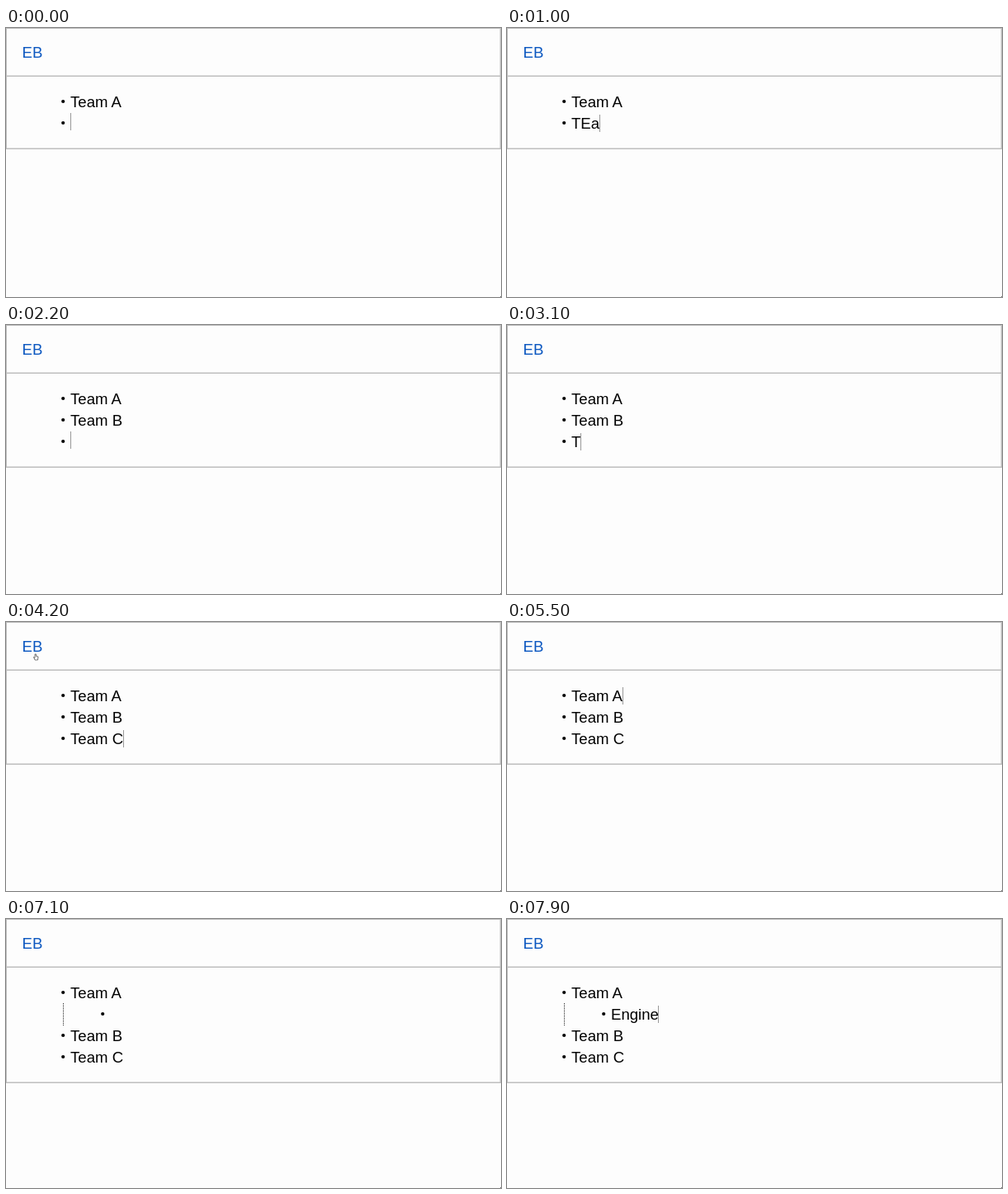
An HTML page that plays this animation: 600 px wide and 326 px high, repeating every 8 s.

```html
<!DOCTYPE html>
<html lang="en">
<head>
<meta charset="utf-8">
<title>Outline editor</title>
<style>
html, body { margin: 0; width: 100%; height: 100%; overflow: hidden; background: #fdfdfd; }
svg { display: block; width: 600px; height: 326px; }
text { font: 18.6px "Liberation Sans", Arial, sans-serif; white-space: pre; }
</style>
</head>
<body>
<svg viewBox="0 0 600 326">
  <g fill="none" stroke="#bebebe" stroke-width="1.5">
    <path d="M0 .25H600M0 58.2H600" />
    <path id="frame" />
  </g>
  <rect x="599" y="325" width="1" height="1" fill="#777" />
  <text x="19.5" y="35.7" fill="#0b57c0">EB</text>
  <g id="rows"></g>
  <path id="guide" d="M69.5 102V129" stroke="#222" stroke-dasharray="1 1" />
  <rect id="caret" width="1" height="21" fill="#999" />
  <path id="pointer" fill="#fff" stroke="#555" stroke-width=".8" />
</svg>
<script>
const LOOP = 8000, ROW = 26;
const $ = id => document.getElementById(id);
const shapes = {
  hand: 'M-1 -3.5V1L-2.5 0L-1 3.5H2.5L3 -.5L.5 -1V-3.5Z',
  arrow: 'M0 -4V4L2 2.5H4.5Z',
  beam: 'M-1.5 -4.5H1.5M0 -4.5V4.5M-1.5 4.5H1.5'
};

// Each step is [time, document]; "_" is the caret, a tab indents.
const steps = [];
const type = (before, after, list) =>
  list.forEach(([t, s]) => steps.push([t, before + s + after]));

type('Team A\n', '', [
  [0, '_'], [400, 'TE_'], [600, 'TEa_'], [700, 'TEam_'],
  [1000, 'TEa_'], [1100, 'TE_'], [1200, 'T_'], [1300, 'Te_'], [1400, 'Tea_'], [1500, 'Team_'],
  [1700, 'Team _'], [2000, 'Team B_']
]);
type('Team A\nTeam B\n', '', [
  [2200, '_'], [2600, 'T_'], [2700, 'TE_'], [3100, 'T_'], [3200, 'Te_'], [3300, 'Tea_'],
  [3500, 'Team_'], [3700, 'Team _'], [3900, 'Team C_'],
  [4400, 'Team C'], [4900, 'Team C_'], [5400, 'Team C']
]);
type('Team A', '\nTeam B\nTeam C', [
  [5500, '_'], [5600, '\n_'], [5700, '\n\t_'], [6100, '\n\t'], [6600, '\n\t_'], [7100, '\n\t'],
  [7200, '\n\tE_'], [7300, '\n\tEn_'], [7500, '\n\tEng_'], [7600, '\n\tEngi_'],
  [7800, '\n\tEngin_'], [7900, '\n\tEngine_']
]);

function make(tag, attrs) {
  const el = document.createElementNS('http://www.w3.org/2000/svg', tag);
  for (const k in attrs) el.setAttribute(k, attrs[k]);
  $('rows').append(el);
  return el;
}

function show(el, on) {
  el.setAttribute('visibility', on ? 'visible' : 'hidden');
}

function drawDocument(doc) {
  const lines = doc.split('\n');
  $('rows').replaceChildren();
  show($('caret'), doc.includes('_'));
  show($('guide'), doc.includes('\t'));
  const bottom = 68.2 + ROW * lines.length + 26;
  $('frame').setAttribute('d', `M.25 0V${bottom}H599.4V0`);
  lines.forEach((line, i) => {
    const x = line.startsWith('\t') ? 126 : 78;
    const y = 89 + ROW * i;
    const words = line.replace(/[\t_]/g, '');
    make('circle', { cx: x - 8.8, cy: y, r: 2.1 });
    const text = make('text', { x, y: y + 6.7 });
    text.textContent = words;
    if (line.includes('_')) {
      $('caret').setAttribute('x', Math.floor(x + (words ? text.getComputedTextLength() : 0)));
      $('caret').setAttribute('y', y - (words ? 10 : 12));
    }
  });
}

function drawPointer(time) {
  const on = time >= 4200 && time < 5500;
  show($('pointer'), on);
  if (!on) return;
  const t = Math.min(1, (Math.floor(time / 100) - 42) / 7), u = 1 - t;
  const bend = (a, b, c) => u * u * a + 2 * u * t * b + t * t * c;
  let x = bend(36, 80, 138), y = bend(42.5, -45, 74);
  if (time >= 5200) [x, y] = [145, 86];
  else if (time >= 5100) [x, y] = [141, 81];
  $('pointer').setAttribute('d', shapes[t === 0 ? 'hand' : y > 70 ? 'beam' : 'arrow']);
  $('pointer').setAttribute('transform', `translate(${x} ${y})`);
}

let shown;
function draw() {
  const time = performance.now() % LOOP;
  const doc = steps.findLast(s => s[0] <= time)[1];
  if (doc !== shown) drawDocument(shown = doc);
  drawPointer(time);
  requestAnimationFrame(draw);
}
draw();
</script>
</body>
</html>
```
